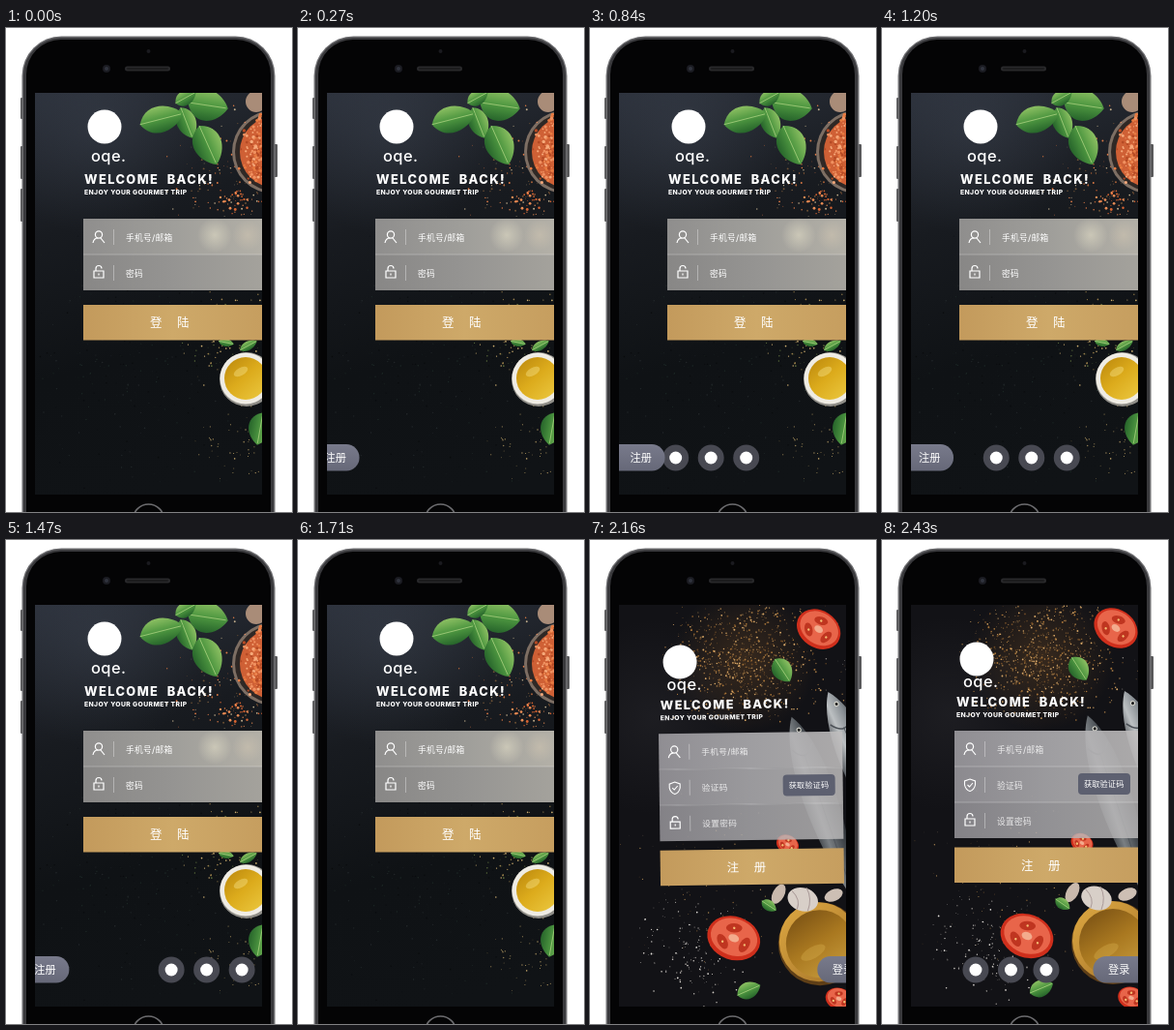
These frames come from a looping animation (296x500 px, 2.46 s). An HTML page with a canvas:

```html
<!DOCTYPE html>
<html lang="zh">
<head>
<meta charset="utf-8">
<style>
  html, body { margin: 0; width: 100%; height: 100%; overflow: hidden; background: #fff; }
  canvas { display: block; }
</style>
</head>
<body>
<canvas id="stage" width="296" height="500"></canvas>
<script>
const ctx = document.getElementById('stage').getContext('2d');
const LOOP = 2460;
const TAU = Math.PI * 2;

const progress = (t, start, length) => Math.min(1, Math.max(0, (t - start) / length));
const easeIn = u => u ** 3;
const easeOut = u => 1 - (1 - u) ** 3;
const backOut = u => 1 + 2.70158 * (u - 1) ** 3 + 1.70158 * (u - 1) ** 2;
const enter = (t, start) => backOut(progress(t, start, 1164));
const leave = (t, start) => easeIn(progress(t, start, 480));

function random(seed) {
  return () => (seed = (seed * 16807) % 2147483647) / 2147483647;
}

function box(x, y, w, h, fill, radius = 0) {
  ctx.beginPath();
  ctx.roundRect(x, y, w, h, radius);
  ctx.fillStyle = fill;
  ctx.fill();
}

function oval(x, y, rx, ry, fill, angle = 0) {
  ctx.beginPath();
  ctx.ellipse(x, y, rx, ry, angle, 0, TAU);
  ctx.fillStyle = fill;
  ctx.fill();
}

const disc = (x, y, r, fill) => oval(x, y, r, r, fill);

function line(d, color, width = 1) {
  ctx.strokeStyle = color;
  ctx.lineWidth = width;
  ctx.stroke(new Path2D(d));
}

function shape(d, fill) {
  ctx.fillStyle = fill;
  ctx.fill(new Path2D(d));
}

function linear(x0, y0, x1, y1, ...colors) {
  const g = ctx.createLinearGradient(x0, y0, x1, y1);
  colors.forEach((c, i) => g.addColorStop(i / (colors.length - 1), c));
  return g;
}

function glow(x, y, r, rgb, alpha) {
  const g = ctx.createRadialGradient(x, y, 0, x, y, r);
  g.addColorStop(0, `rgba(${rgb},${alpha})`);
  g.addColorStop(1, `rgba(${rgb},0)`);
  disc(x, y, r, g);
}

function text(str, x, y, size, weight = 400, color = '#fff', spacing = 0) {
  ctx.font = `${weight} ${size}px Inter, "Noto Sans CJK SC", "Noto Sans CJK", sans-serif`;
  ctx.letterSpacing = spacing + 'px';
  ctx.fillStyle = color;
  ctx.fillText(str, x, y);
}

// Loose cloud of crumbs, denser in the middle
function crumbs(seed, count, x, y, w, h, colors, size = 1) {
  const rnd = random(seed);
  for (let i = 0; i < count; i++) {
    const dx = rnd() + rnd() - 1, dy = rnd() + rnd() - 1;
    disc(x + dx * w, y + dy * h, size * (.3 + rnd() * .6), colors[i % colors.length]);
  }
}

function leaf(x, y, length, width, angle) {
  ctx.save();
  ctx.translate(x, y);
  ctx.rotate(angle);
  const l = length / 2;
  shape(`M${-l} 0C${-l * .6} ${-width * .75} ${l * .5} ${-width * .6} ${l} 0C${l * .5} ${width * .6} ${-l * .6} ${width * .75} ${-l} 0`,
    linear(0, -width / 2, 0, width / 2, '#8cbf62', '#4d9640', '#27652b'));
  line(`M${-l} 0L${l * .9} 0`, '#a4cd7b', .8);
  ctx.restore();
}

function tomato(x, y, r, angle) {
  ctx.save();
  ctx.translate(x, y);
  ctx.rotate(angle);
  oval(0, 0, r, r * .8, '#cf2f1c');
  oval(0, -1, r * .88, r * .68, '#e8654a');
  for (let i = 0; i < 3; i++) {
    const a = i * TAU / 3 + .3, dx = Math.cos(a) * r * .48, dy = Math.sin(a) * r * .37;
    oval(dx, dy, r * .3, r * .17, '#bf3520', a + 1.5);
    disc(dx, dy, 1.2, '#f4bd72');
  }
  oval(0, 0, r * .2, r * .14, '#f3ab8d');
  ctx.restore();
}

function fish(x, y, length, width, angle, ...colors) {
  ctx.save();
  ctx.translate(x, y);
  ctx.rotate(angle);
  const l = length / 2;
  shape(`M${-l} 0C${-l * .6} ${-width} ${l * .4} ${-width * .7} ${l} 0C${l * .4} ${width * .7} ${-l * .6} ${width} ${-l} 0`,
    linear(0, -width * .65, 0, width * .65, ...colors));
  line(`M${-l * .68} ${-width * .4}Q${-l * .5} 0 ${-l * .68} ${width * .4}`, '#4b5056', 1.5);
  line(`M${-l * .6} 0L${l * .9} 0`, '#4c5258', .8);
  disc(-l * .85, -width * .1, 2.6, '#d7d6cd');
  disc(-l * .85, -width * .1, 1.5, '#17181a');
  ctx.restore();
}

function heading(x, y, markY, nameY) {
  disc(x + 21, markY, 17.5, '#fff');
  text('oqe.', x + 7, nameY, 16.5, 500, '#fff', .4);
  text('WELCOME  BACK!', x, y + 4, 12.8, 800, '#fff', 1.4);
  text('ENJOY YOUR GOURMET TRIP', x, y + 15, 6.8, 800, '#fff', .38);
}

function userIcon(x, y) {
  ctx.beginPath();
  ctx.arc(x, y - 2.5, 3.6, 0, TAU);
  ctx.strokeStyle = '#fff';
  ctx.lineWidth = 1.2;
  ctx.stroke();
  line(`M${x - 6} ${y + 6}Q${x - 5} ${y + 1} ${x - 1} ${y + 1}M${x + 2} ${y + 1}L${x + 6} ${y + 6}`, '#fff', 1.2);
}

function lockIcon(x, y) {
  line(`M${x - 5} ${y - 2}h10v7h-10zM${x - 3} ${y - 2}v-2.5a3 3 0 0 1 6 0M${x} ${y + .5}v2`, '#fff', 1.2);
}

function shieldIcon(x, y) {
  line(`M${x} ${y - 6}l5.5 2v4q-1 5-5.5 6.5q-4.5-1.5-5.5-6.5v-4zM${x - 2.5} ${y}l2 2l3.5-4`, '#fff', 1.1);
}

function field(x, y, label, icon, fill, color = '#fff') {
  box(x, y, 265 - x, 37, fill);
  icon(x + 16, y + 19);
  line(`M${x + 31.5} ${y + 11}v16`, 'rgba(255,255,255,.35)');
  text(label, x + 44, y + 22.5, 8.7, 500, color, .3);
}

function button(x, y, label) {
  box(x, y, 265 - x, 36.5, linear(x, y, 265, y, '#c39a5c', '#cea969', '#c69e5f'));
  text(label, x + 69, y + 23, 12.5, 500, '#fff', 15.5);
}

function loginPage() {
  box(30, 66, 236, 417, linear(30, 67, 150, 482, '#2b303a', '#181b20', '#0f1215', '#101316'));
  glow(95, 105, 110, '72,80,94', .3);
  crumbs(17, 260, 130, 340, 110, 160, ['#23282b', '#0a0c0e', '#1d2826'], .9);
  crumbs(31, 150, 222, 165, 60, 90, ['#b9683b', '#c0ad8b', '#6c5135', '#dd7a46'], 1.1);
  crumbs(8, 130, 230, 325, 48, 60, ['#967d4a', '#d0b071', '#5c6e3d'], 1);
  crumbs(23, 50, 235, 430, 40, 45, ['#8b7950', '#b49a62'], .9);

  leaf(187, 98, 34, 20, 1.2);
  leaf(161, 94, 46, 27, -.25);
  leaf(209, 80, 42, 32, .15);
  leaf(209, 121, 44, 29, 1.15);
  leaf(186, 72, 24, 15, -.5);

  disc(259, 76, 11, '#a98c78');
  disc(277, 128, 43, '#7d6e63');
  disc(277, 128, 40, '#2f2825');
  disc(279, 128, 37, '#cf6035');
  crumbs(5, 260, 266, 126, 25, 38, ['#f09160', '#b54a24', '#e87b42', '#f6a97a'], 2);
  crumbs(44, 34, 244, 178, 24, 16, ['#d96532', '#e88b54'], 1.6);

  leaf(228, 325, 16, 8, .2);
  leaf(251, 328, 20, 9, -.5);
  disc(249, 363, 28, '#8f8d87');
  disc(248, 362, 26.5, '#efece4');
  disc(248, 362, 22, linear(230, 340, 265, 380, '#bd8a0e', '#dcab1c', '#e9c43b'));
  oval(243, 355, 8, 4, 'rgba(255,242,160,.35)', -.5);
  leaf(263, 414, 34, 24, 1.75);

  heading(81, 157, 102, 138);
  field(80, 197, '手机号/邮箱', userIcon, linear(80, 0, 265, 0, '#8f8e8d', '#9f9e9a', '#b3b0a7'));
  field(80, 234, '密码', lockIcon, linear(80, 0, 265, 0, '#888786', '#959492', '#a4a29c'));
  glow(216, 214, 18, '225,220,198', .6);
  glow(250, 214, 16, '215,202,180', .45);
  line('M80 234h185', 'rgba(255,255,255,.25)');
  button(80, 286, '登陆');
}

function registerPage() {
  box(20, 45, 301, 525, '#121216');
  glow(70, 180, 100, '54,54,60', .3);
  glow(165, 122, 75, '125,84,42', .35);
  crumbs(12, 800, 165, 120, 85, 70, ['#a87539', '#d5a566', '#6b4926', '#8f6a3e'], 1.1);
  crumbs(91, 130, 130, 350, 100, 110, ['#735632', '#a4814e', '#474039'], .9);
  crumbs(57, 150, 108, 425, 60, 60, ['#cfcac4', '#8f8b88', '#e6e2dd'], 1);
  crumbs(64, 90, 285, 150, 40, 90, ['#8b8681', '#b78a50'], .9);

  shape('M273 102L296 104Q314 145 325 176Q300 168 281 158Z', linear(273, 110, 320, 165, '#3a3b3e', '#5c5e60', '#37383b'));
  line('M319 50L290 104', '#6b452c', 11);
  fish(245, 278, 204, 27, 1.25, '#24272b', '#4a4f54', '#7a7f83', '#3c4044');
  fish(290, 248, 200, 29, 1.17, '#3b4046', '#868c91', '#bcc0c2', '#55595e');
  tomato(242, 91, 24, .6);
  leaf(204, 133, 28, 20, 1);
  tomato(207, 313, 12, .5);
  tomato(150, 409, 28, .35);
  tomato(258, 473, 14, .3);

  disc(239, 416, 43, '#5f3f17');
  disc(238, 414, 41, linear(205, 380, 270, 455, '#d9a440', '#a6752a'));
  disc(239, 416, 35, linear(215, 385, 255, 448, '#7d5415', '#a97820', '#c4983a'));
  oval(232, 425, 14, 6, 'rgba(226,185,86,.3)', -.5);

  oval(222, 370, 16, 12, '#d8cfc8', .3);
  line('M211 361Q220 370 216 380M226 358Q232 369 227 382', '#aa9a98', 1);
  oval(197, 364, 6, 11, '#c9b9ad', .5);
  oval(254, 366, 10, 6, '#cdbfb4', -.4);
  leaf(187, 376, 18, 11, .6);
  leaf(165, 463, 26, 17, -.4);

  heading(77, 168, 123, 152);
  const haze = alpha => linear(75, 0, 265, 0, `rgba(160,158,163,${alpha})`, `rgba(178,177,180,${alpha})`, `rgba(192,190,190,${alpha})`);
  const pale = 'rgba(255,255,255,.8)';
  field(75, 197, '手机号/邮箱', userIcon, haze(.88), pale);
  field(75, 234, '验证码', shieldIcon, haze(.85), pale);
  field(75, 271, '设置密码', lockIcon, haze(.8), pale);
  line('M75 234h190M75 271h190', 'rgba(255,255,255,.25)');
  box(203, 241, 54, 22, '#5d6070', 4);
  text('获取验证码', 209, 255, 8.2, 500, '#fff', .1);
  button(75, 317.5, '注册');
}

function tab(x, label, textX, radii) {
  box(x, 430, 60, 27.5, linear(0, 430, 0, 458, '#787a8b', '#666878'), radii);
  text(label, textX, 448, 11.2, 500);
}

function socialIcons(x) {
  for (let i = 0; i < 3; i++) {
    disc(x + i * 36.5, 444, 13.5, '#484952');
    disc(x + i * 36.5, 444, 6.5, '#fff');
  }
}

function phone() {
  box(15, 72, 4, 22, '#59595b', 1);
  box(15, 122, 4, 34, '#59595b', 1);
  box(15, 166, 4, 34, '#59595b', 1);
  box(277, 120, 4, 34, '#59595b', 1);
  box(16.5, 8.5, 262, 540, '#6a6a6d', 41);
  box(18, 10, 259, 540, '#39393c', 39);
  box(21, 12, 253, 540, '#040405', 36);
  disc(147.5, 24, 2, '#1a1a1f');
  disc(104, 42, 4, '#1b1c22');
  disc(104, 42, 2, '#30333d');
  box(123, 39.5, 47, 5, '#29292b', 2.5);
  box(125, 41, 43, 2, '#1c1c1e', 1);
  ctx.beginPath();
  ctx.arc(147.5, 508, 16, 0, TAU);
  ctx.strokeStyle = '#6c6c6f';
  ctx.lineWidth = 1.6;
  ctx.stroke();
}

function draw(t) {
  ctx.clearRect(0, 0, 296, 500);
  phone();
  ctx.save();
  ctx.beginPath();
  ctx.rect(30, 67, 235, 415);
  ctx.clip();

  loginPage();
  socialIcons(462.5 - 340 * (enter(t, 145) - leave(t, 1220)));
  const edge = 26 + 48 * (enter(t, 0) - leave(t, 1200));
  tab(edge - 60, '注册', edge - 36, [0, 13.5, 13.5, 0]);

  // The second page swings up around a point beyond the lower right corner
  if (t > 1710) {
    const angle = -90 * (1 - easeOut(progress(t, 1710, 565)));
    ctx.save();
    ctx.translate(326, 508);
    ctx.rotate(angle * Math.PI / 180);
    ctx.translate(-326, -508);
    registerPage();
    ctx.restore();
    socialIcons(-241.5 + 340 * enter(t, 2005));
    const x = 269 - 48 * enter(t, 1930);
    tab(x, '登录', x + 15.5, [13.5, 0, 0, 13.5]);
  }
  ctx.restore();
}

function tick() {
  draw(performance.now() % LOOP);
  requestAnimationFrame(tick);
}
tick();
</script>
</body>
</html>
```
